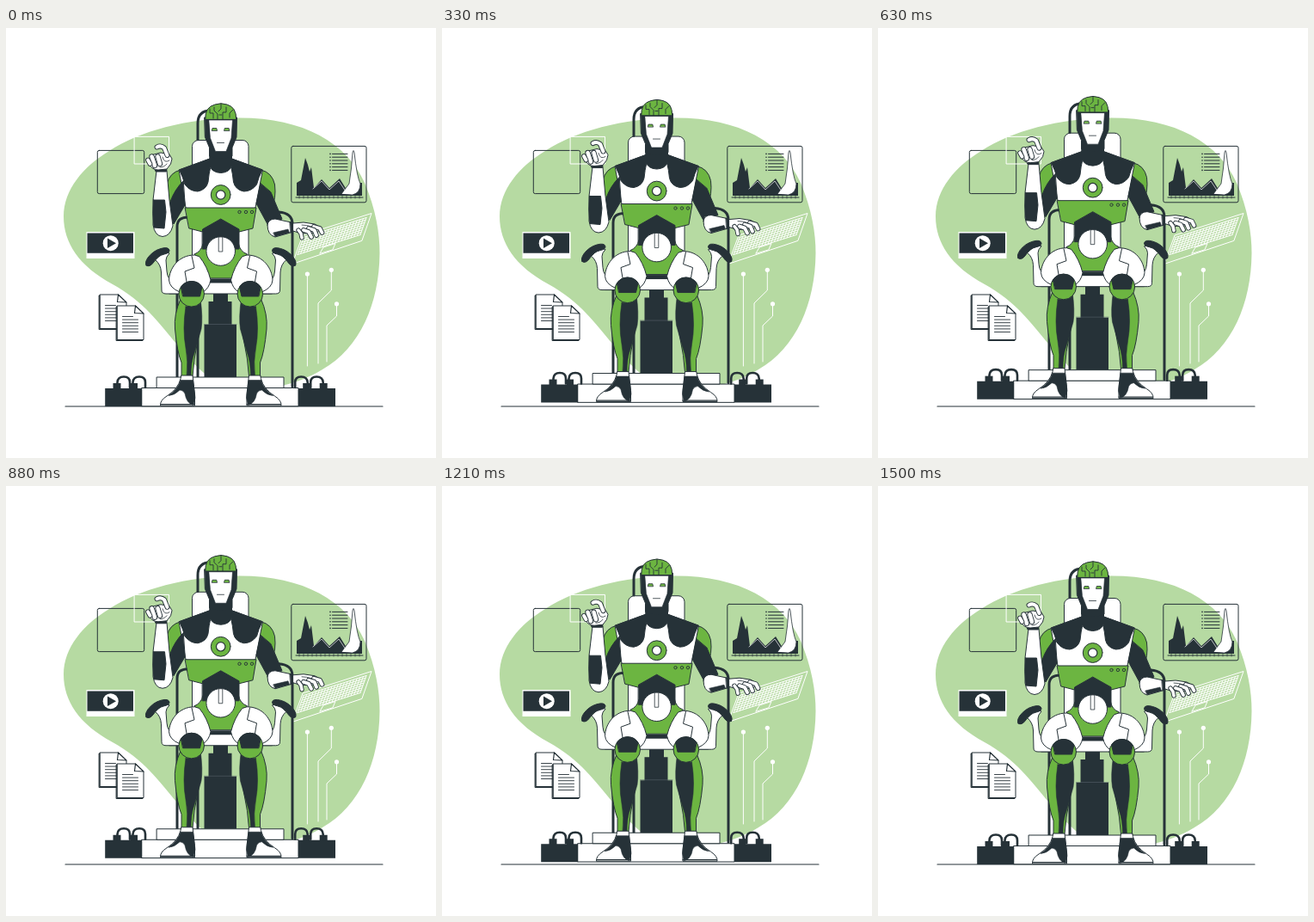
These frames come from a looping animation (500x500 px, 1540 ms). An HTML page with a canvas:

```html
<!DOCTYPE html>
<html>
<head>
<meta charset="utf-8">
<style>
html, body { margin: 0; width: 100%; height: 100%; overflow: hidden; background: #fff; }
canvas { display: block; width: 500px; height: 500px; }
</style>
</head>
<body>
<canvas id="stage"></canvas>
<script>
const DARK = '#263238', GREEN = '#6cb541', PALE = '#b6daa2', WHITE = '#fff';
const LOOP = 1540, FPS = 24, HALF_BOB = 18, RISE = 10;
const BODY_AXIS = 249.75, BASE_AXIS = 249.1;
const canvas = document.getElementById('stage');
const ctx = canvas.getContext('2d');
const ratio = window.devicePixelRatio || 1;
canvas.width = canvas.height = 500 * ratio;

function paint(fill, stroke, width, path) {
  const target = path ? [path] : [];
  if (fill) { ctx.fillStyle = fill; ctx.fill(...target); }
  if (stroke) { ctx.strokeStyle = stroke; ctx.lineWidth = width; ctx.stroke(...target); }
}

function shape(d, fill, stroke = DARK, width = 1) {
  paint(fill, stroke, width, new Path2D(d));
}
const line = (d, color = DARK, width = 1) => shape(d, null, color, width);

function box(x, y, w, h, fill, stroke = DARK, radius = 0, width = 1) {
  ctx.beginPath();
  ctx.roundRect(x, y, w, h, radius);
  paint(fill, stroke, width);
}

function disc(x, y, r, fill, stroke = DARK, width = 1) {
  ctx.beginPath();
  ctx.arc(x, y, r, 0, 2 * Math.PI);
  paint(fill, stroke, width);
}

// White rounded finger with a dark outline.
function finger(d, width) {
  line(d, DARK, width + .9);
  line(d, WHITE, width - .9);
}

function bothSides(draw, axis = BODY_AXIS) {
  draw();
  ctx.save();
  ctx.translate(2 * axis, 0);
  ctx.scale(-1, 1);
  draw();
  ctx.restore();
}

function drawDocument(x, y) {
  const page = 'h21l9.5 9v30.5h-30.5z';
  shape(`M${x - 1} ${y + 1}${page}`, DARK);
  shape(`M${x} ${y}${page}`, WHITE);
  shape(`M${x + 21} ${y}l-1 8.5 10.5 .5z`, WHITE, DARK, 1.2);
  for (let i = 0; i < 6; i++) {
    line(`M${x + 6} ${y + 12.5 + i * 3.6}h${i < 1 ? 12 : 18}`, DARK, .9);
  }
}

function drawChart() {
  box(331.8, 137.4, 87.2, 65.4, null, DARK, 2);
  for (let i = 0; i < 6; i++) {
    const y = 146.4 + i * 3.8;
    disc(377, y, .8, DARK, null);
    line(`M379.5 ${y}H397`);
  }
  shape('M338 195V180L343 177L348 151Q351 158 353 167L355 162L358 186L367 176L376 186L388 175L396 188L400 180H414V195Z', DARK, null);
  shape('M390 193L399 181Q402 163 403 145Q404 140 405 145Q408 173 412 181Q412 192 403 194Z', WHITE, DARK, .8);
  line('M357 187L367 178L376 188L387 178L395 190', WHITE, .7);
  line('M337 197H415', DARK, 1);
  for (let x = 341; x < 414; x += 5) line(`M${x} 195.5v2.5`, DARK, .7);
}

function drawTablet() {
  line('M333 274L345 241L425 215.5L414 247Z', WHITE);
  // Key grid spanned by the long and short edges of the slab.
  const point = (u, v) => `${346 + 73 * u - 7 * v} ${243.5 - 23 * u + 20 * v}`;
  for (let i = 0; i <= 7; i++) line(`M${point(0, i / 7)}L${point(1, i / 7)}`, WHITE, 1);
  for (let i = 0; i <= 20; i++) line(`M${point(i / 20, 0)}L${point(i / 20, 1)}`, WHITE, .9);
  line('M365 262L369 255L383 250.5L380 257.5Z', WHITE);
}

function drawBackdrop() {
  shape('M120 143C155 120 210 105 270 104.5C345 104 396 133 417 180C430 211 434.5 238 434.5 262C434 320 412 372 368 397C336 416 310 419 280 420C238 418 220 392 198 367C178 343 160 318 124 298C85 277 67 250 67 219C67 188 90 161 120 143Z', PALE, null);
  box(106.3, 142.4, 54.4, 50.2, null, DARK, 2);
  box(149.5, 126.4, 40, 31.6, null, WHITE);

  box(93.5, 237, 56, 31, WHITE, null);
  box(94.5, 238.5, 53.5, 23.3, DARK, null);
  disc(121.7, 250.2, 9, WHITE, null);
  shape('M118 244.5L128 250.2L118 256Z', DARK, null);

  drawDocument(109.5, 310);
  drawDocument(129.5, 323);
  drawChart();
  drawTablet();

  line('M350.4 286V393M378.3 281V305L363 320V390M384.5 321V335L373 346V388', WHITE);
  disc(350.4, 286, 2.6, WHITE, null);
  disc(378.3, 281.3, 2.6, WHITE, null);
  disc(384.5, 320.8, 2.6, WHITE, null);
}

function drawBase() {
  box(158, 418.5, 182, 21.3, WHITE);
  box(175.5, 406, 147.5, 12.5, WHITE);
  bothSides(() => {
    box(115.2, 419, 43, 21, DARK, null);
    line('M129.5 417V412Q130 405.5 137 405.5Q144 405.5 144 412V418', DARK, 2.6);
    line('M147.5 417V412Q148 405.5 155 405.5Q162 405.5 162 412V418', DARK, 2.6);
    box(124.5, 413, 9, 7, DARK, null);
    box(145, 413, 8, 7, DARK, null);
  }, BASE_AXIS);
}

function drawChair() {
  line('M238 96C228 96 223 101 223 111V406', DARK, 3);
  line('M214 220Q199 219 199 231V406', DARK, 3);
  line('M317 214Q333 215 333 228V417', DARK, 3);
  box(216.5, 130.5, 65.5, 166, WHITE, DARK, 7);
  shape('M241 308H258V318H262.5V345H268V406H230.5V345H235.5V318H241Z', DARK, null);
  line('M230.5 344.5H268', '#566168', .6);
  drawBase();

  shape('M190 295H309.5V309H190Z', WHITE);
  bothSides(() => {
    shape('M174 270Q180 275 180.5 284L181 305Q181 309 186 309H203V295H196Q188 294 187 283L186 270Q186 266 190 262L184 260Z', WHITE);
    shape('M163 276Q161 273 165 267Q171 259 180 256.5Q189 254 190 258.5Q190 262 184 263Q176 265 172 272Q167 279 163 276Z', DARK);
  });
  box(237, 291.5, 25.5, 5, DARK, null);
}

function drawLeg() {
  shape('M203 315Q195 333 196.5 350Q199 377 204 389V405H217L219 385L226 347L226 316Z', GREEN);
  shape('M209 324Q218 325 226 315Q229 337 227 350L219 378Q215 388 215 405H210Q212 388 209 372Q205 350 209 324Z', DARK, DARK, .6);

  shape('M219 264C200 264 190 280 189.5 293Q190 302 202 307H229Q236 303 238 293Q234 277 225 266Z', WHITE);
  line('M216 265L219 279L208 283L210 295');
  disc(215.7, 309.3, 14.8, GREEN);
  shape('M203.5 301Q208 294.5 215.7 294.5Q224 294.5 228 301L225.5 312H206Z', DARK);

  shape('M203 408Q200 420 187 428Q179 433 179.5 439H219.5V426L217 404H204Z', WHITE);
  shape('M203 409.5H217.5L220 430L218 438.5Q210 437 208 425Q206 421 202 421Q196 427 189 427.5Q200 420 203 409.5Z', DARK, DARK, .6);
  line('M180 437.5H219.5', DARK, 1.2);
}

function drawTorso() {
  shape('M229 251Q227 260 219 263Q228 273 233 291H266.5Q272 273 280.5 263Q272 260 270.5 251Z', GREEN);
  shape('M228.5 234L249.7 222L271 234V257H228.5Z', DARK);
  disc(249.7, 259.5, 16.8, WHITE);
  box(247.6, 243, 4.2, 17, WHITE, DARK, 0, .8);

  bothSides(() => {
    shape('M203 165Q190 168 187 182Q185 198 191 211L207 188Z', GREEN);
  });
  shape('M237 152L201 165L209 209L249.7 220L290 209L298.5 165L262.5 152Z', WHITE);
  shape('M208.5 209H291L287 233L271 237V234L249.7 222L228.5 234V237L213 233Z', GREEN);
  bothSides(() => {
    shape('M237 152L201.5 165Q206 174 208 182Q214 190 223 190Q233 188 235 179Q236 169 237.5 163Z', DARK);
  });
  shape('M237 140H262.5V160Q260 168 249.7 168.5Q239 168 237 160Z', DARK);
  disc(249.7, 194, 11.4, GREEN);
  disc(249.7, 194, 5.2, WHITE, DARK, 1.2);
  for (const x of [271.5, 279, 286]) disc(x, 214, 1.7, GREEN, DARK, .9);
}

function drawHead() {
  shape('M231 104H268.5L268 127L263 139L263 149Q250 155 236.5 149V139L231.5 127Z', DARK);
  shape('M236 107H263.5L262 128L256 143.5H243.5L237.5 128Z', WHITE, DARK, .7);
  shape('M231.8 106Q231 92 243 89Q250 86.5 257 89Q268 92 267.7 106Z', GREEN);
  line('M241 105V99H237V94M246 106V100L242 96V92M250 88V94L247 97M252 106V98H256V92M260 104V99L264 95M251 101H248', DARK, .9);
  for (const x of [239.3, 253.6]) {
    shape(`M${x} 119.2L${x + .7} 116.5H${x + 5.5}L${x + 6.2} 119.2Z`, GREEN, DARK, .8);
  }
  line('M245.5 133.5H253.5', DARK, .8);
}

function drawRaisedArm() {
  shape('M206 178Q196 188 191 202L190 214L195 228L208 206Z', DARK);
  shape('M175 166L171 200V229Q173 242 182 242.5Q191 242 194 230L190 200L187 166Z', WHITE);
  shape('M171.5 200H184.5L186 214L184 233L172 232Q170 215 171.5 200Z', DARK);
  shape('M172 161L187 163L186.5 167H174.5Z', DARK);
  shape('M167 159Q170 165 177 165L187 164Q193 158 193 152L190 147L180 145L168 148Z', WHITE);
  finger('M187.5 148L184 139.5Q180 136 175.5 138.5', 5);
  finger('M179 158L176.5 149.5', 5.4);
  finger('M173 160L169.5 149.5', 5.4);
  finger('M167.5 158L165 153.5', 4.8);
  line('M182 150Q184 158 190 154M179 162Q184 162 187 158', DARK, .8);
}

function drawLoweredArm() {
  shape('M296 181L291 204L304 228L321 222L308 191Z', DARK);
  shape('M304 229Q305 222 313 222L334 226.5V237L313 243Q304 241 304 229Z', WHITE);
  shape('M311 238L328 234L329.5 238L313 242.5Z', DARK, DARK, .6);
  shape('M330 225.5L334 226.5V237L331 238Z', DARK, DARK, .6);
  shape('M334 227L346 226L359 228L366 232L362 238L343 239L334 236Z', WHITE);
  finger('M358 231L365 233L367.5 238', 4.8);
  finger('M352 233L358.5 235L361 241', 4.8);
  finger('M346 235L352 237L355 243', 4.8);
  finger('M340 235L343 239L344 244', 4.4);
  line('M344 229Q350 229 355 231', DARK, .8);
}

function drawRobot() {
  drawTorso();
  bothSides(drawLeg);
  drawHead();
  drawRaisedArm();
  drawLoweredArm();
}

// Linear rise and fall, sampled at the film rate.
function bob(time) {
  const step = Math.floor((time + 4) * FPS / 1000) + 1;
  const phase = step % (2 * HALF_BOB);
  const height = 1 - Math.abs(phase - HALF_BOB) / HALF_BOB;
  return RISE / HALF_BOB - RISE * height;
}

function render(time) {
  ctx.setTransform(ratio, 0, 0, ratio, 0, 0);
  ctx.fillStyle = WHITE;
  ctx.fillRect(0, 0, 500, 500);
  ctx.lineJoin = ctx.lineCap = 'round';
  drawBackdrop();
  line('M69 440H438', DARK, 1.1);
  ctx.translate(0, bob(time));
  drawChair();
  drawRobot();
}

const start = performance.now();
function tick() {
  render((performance.now() - start) % LOOP);
  requestAnimationFrame(tick);
}
tick();
</script>
</body>
</html>
```
